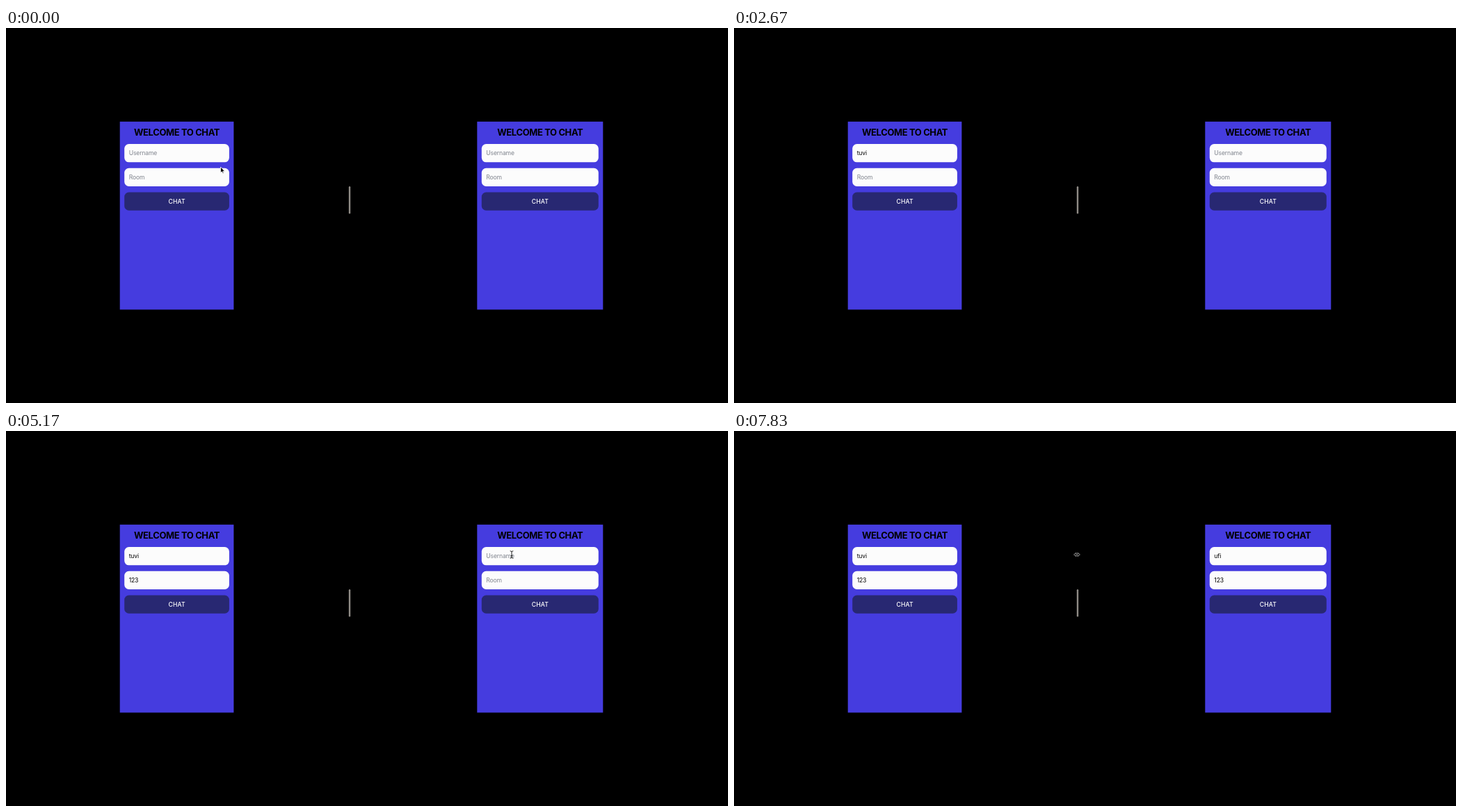
Recreate the animation shown at these times as an HTML page. Size 1038 px wide and 540 px high, loop 8 s.

```html
<!DOCTYPE html>
<html lang="en">
<head>
<meta charset="utf-8">
<title>Chat login</title>
<style>
  html, body { margin: 0; width: 100%; height: 100%; overflow: hidden; background: #000; }
  svg { display: block; width: 1038px; height: 540px; }
  text { font: 8.65px Inter, Roboto, sans-serif; letter-spacing: -.02em; fill: #000; }
  .title { font-size: 13px; font-weight: 700; letter-spacing: -.03em; text-anchor: middle; }
  .button { font-weight: 500; letter-spacing: .01em; fill: #fff; text-anchor: middle; }
  .hint { fill: #80858e; }
</style>
</head>
<body>
<svg id="stage" viewBox="0 0 1038 540">
  <rect x="492.8" y="228" width="2.4" height="39.5" rx="1.2" fill="#8f8b86"/>
  <g id="forms"></g>
  <rect id="caret" width=".9" height="10.4" fill="#222"/>
  <g id="mouse">
    <path id="arrow" d="M0 0V8.6L2 6.8L3.3 9.6L4.6 9L3.4 6.3H6Z" fill="#000" stroke="#fff" stroke-width=".8"/>
    <path id="beam" d="M-2.3 -5.2Q0 -5.2 0 -3.6Q0 -5.2 2.3 -5.2M0 -3.6V3.6M-2.3 5.2Q0 5.2 0 3.6Q0 5.2 2.3 5.2M-1.3 1.6H1.3" fill="none" stroke="#222"/>
    <path id="resize" d="M-4.4 0L-1 -2.7V2.7ZM4.4 0L1 -2.7V2.7Z" fill="#000" stroke="#ccc" stroke-width=".7"/>
  </g>
</svg>
<script>
const LOOP = 8000, TICKS = 48;
const $ = id => document.getElementById(id);

// Left edge and width
const panels = [[163.7, 163.7], [677.3, 181]];

// All times are in ticks: the field gets focus, then one key every step
const fields = [
  { text: 'tuvi', hint: 'Username', focus: 3, start: 8, step: 1 },
  { text: '123', hint: 'Room', focus: 12, start: 18.5, step: 1.5 },
  { text: 'ufi', hint: 'Username', focus: 32, start: 35, step: 1 },
  { text: '123', hint: 'Room', focus: 39, start: 40.5, step: 1.5 },
];

// The pointer follows a Bezier curve, rests, then hides
const trips = [
  { start: 0, end: 4, hide: 8, path: [[308.5, 200], [260, 181]] },
  { start: 24, end: 29, hide: 35, path: [[262, 180], [597, 271], [740, -60], [727, 178]] },
  { start: 44, end: 47, hide: TICKS, path: [[721.5, 176.5], [493, 178]] },
];

const box = (x, y, w, h, fill, rx = 0) =>
  `<rect x="${x}" y="${y}" width="${w}" height="${h}" rx="${rx}" fill="${fill}"/>`;

function panel([x, w]) {
  const mid = x + w / 2, rowY = i => 167.1 + 34.7 * i;
  const row = (i, fill) => box(x + 6.5, rowY(i), w - 13, 26.2, fill, 6.5);
  const label = (i, kind, at, text = '') =>
    `<text class="${kind}" x="${at}" y="${rowY(i) + 16.2}">${text}</text>`;
  return box(x, 134.8, w, 270.7, '#453cdf') +
    `<text class="title" x="${mid}" y="154.9">WELCOME TO CHAT</text>` +
    row(0, '#fcfcfc') + label(0, 'field', x + 13) +
    row(1, '#fcfcfc') + label(1, 'field', x + 13) +
    row(2, '#282872') + label(2, 'button', mid, 'CHAT');
}

$('forms').innerHTML = panels.map(panel).join('');
const labels = [...document.querySelectorAll('.field')];

const show = (el, on) => el.setAttribute('visibility', on ? 'visible' : 'hidden');

const inField = (x, y) => Math.abs(y - 180) < 13 &&
  panels.some(([left, w]) => Math.abs(x - left - w / 2) < w / 2 - 6.5);

function bezier(points, f) {
  if (points.length === 1) return points[0];
  const mix = (a, b) => a + (b - a) * f;
  return bezier(points.slice(1).map(([x, y], i) => [mix(points[i][0], x), mix(points[i][1], y)]), f);
}

function keysTyped({ text, start, step }, tick) {
  const n = Math.floor((tick - start) / step) + 1;
  return Math.max(0, Math.min(text.length, n));
}

function drawFields(tick) {
  let active = -1;
  fields.forEach((field, i) => {
    const n = keysTyped(field, tick);
    labels[i].textContent = n ? field.text.slice(0, n) : field.hint;
    labels[i].classList.toggle('hint', !n);
    if (tick >= field.focus) active = i;
  });
  show($('caret'), false);
  if (active >= 0) drawCaret(fields[active], labels[active], tick);
}

// The caret blinks every half second, starting again with each key
function drawCaret(field, label, tick) {
  const n = keysTyped(field, tick);
  const since = n ? field.start + (n - 1) * field.step : field.focus;
  show($('caret'), Math.floor((tick - since) / 3) % 2 === 0);
  $('caret').setAttribute('x', +label.getAttribute('x') + (n ? label.getComputedTextLength() : 0));
  $('caret').setAttribute('y', label.getAttribute('y') - 8.3);
}

function drawPointer(tick) {
  const trip = trips.find(t => tick >= t.start && tick < t.hide);
  let shape = '';
  if (trip) {
    const f = Math.min(1, (tick - trip.start) / (trip.end - trip.start));
    const [x, y] = bezier(trip.path, f);
    shape = inField(x, y) ? 'beam' : Math.abs(x - 494) < 4 ? 'resize' : 'arrow';
    $('mouse').setAttribute('transform', `translate(${x} ${y})`);
  }
  for (const id of ['arrow', 'beam', 'resize']) show($(id), id === shape);
}

// The screen refreshes six times a second
function frame(now) {
  const tick = Math.floor((now % LOOP + 4) / LOOP * TICKS) % TICKS;
  drawFields(tick);
  drawPointer(tick);
  requestAnimationFrame(frame);
}
frame(0);
</script>
</body>
</html>
```
